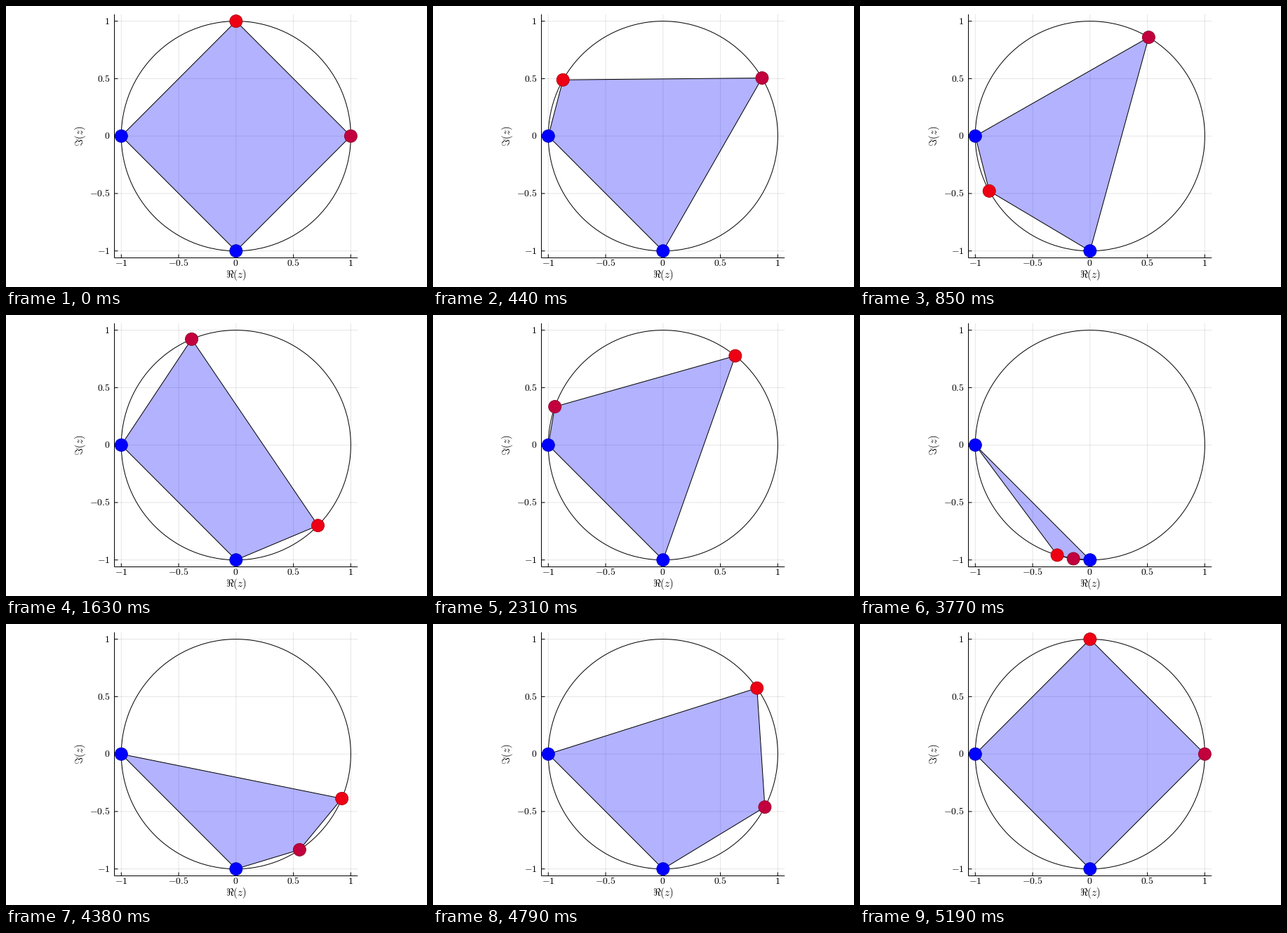
Write a matplotlib script that moves like this. It is 600 px wide and 400 px high and loops after 5210 ms.

```python
import numpy as np
import matplotlib.pyplot as plt
from matplotlib.animation import FuncAnimation
from matplotlib.patches import Circle, Polygon

W, H, DPI = 600, 400, 100
TICK_MS, LOOP_MS = 10, 5210
FPS, STEPS = 48, 250  # poses per second, poses per loop
LEFT, TOP, BOTTOM = 154.5, 11.8, 358.5
SIDE = BOTTOM - TOP
RIGHT = LEFT + SIDE
CX, CY, R = LEFT + SIDE / 2, TOP + SIDE / 2, SIDE / 2.12
PX = 72 / DPI  # points per pixel
BLUE, RED, CRIMSON = (0, 0, 1), (0.93, 0, 0.08), (0.76, 0, 0.24)

plt.rcParams["mathtext.fontset"] = "cm"

fig = plt.figure(figsize=(W / DPI, H / DPI), dpi=DPI, facecolor="white")
ax = fig.add_axes([0, 0, 1, 1])
ax.set_xlim(0, W)
ax.set_ylim(H, 0)
ax.axis("off")


def point(angle):
    return CX + R * np.cos(angle), CY - R * np.sin(angle)


def line(xs, ys, **style):
    ax.plot(xs, ys, color="black", lw=PX, solid_capstyle="butt", snap=False, **style)


def label(x, y, text, size, **style):
    ax.text(x, y, f"${text}$", fontsize=size * PX, **style)


def dot(color):
    edge = tuple(0.75 * c for c in color)
    return ax.add_patch(Circle((0, 0), 9, fc=color, ec=edge, lw=0.9 * PX, zorder=5))


# Grid, ticks and tick labels
for v in (-1, -0.5, 0, 0.5, 1):
    x, y = CX + R * v, CY - R * v
    line([x, x], [TOP, BOTTOM], alpha=0.1, zorder=1)
    line([LEFT, RIGHT], [y, y], alpha=0.1, zorder=1)
    line([x, x], [BOTTOM - 5, BOTTOM], zorder=2)
    line([LEFT, LEFT + 5], [y, y], zorder=2)
    label(x - 0.4, 370.5, f"{v:g}", 13.7, ha="center", va="baseline")
    label(148.3, y + 4.3, f"{v:g}", 13.7, ha="right", va="baseline")

line([LEFT, LEFT], [TOP, BOTTOM], zorder=2)
line([LEFT, RIGHT], [BOTTOM, BOTTOM], zorder=2)
label(CX, 383.3, r"\Re(z)", 15, ha="center", va="center")
label(106.3, CY - 0.5, r"\Im(z)", 15, ha="center", va="center", rotation=90)

ax.add_patch(Circle((CX, CY), R, fill=False, ec="black", lw=PX, zorder=3))
quad = ax.add_patch(Polygon([(0, 0)] * 4, fc=(0, 0, 1, 0.3), ec="black", lw=PX,
                            snap=False, zorder=4))

FIXED = (np.pi, 1.5 * np.pi)
for a in FIXED:
    dot(BLUE).center = point(a)
slow, fast = dot(CRIMSON), dot(RED)


def update(i):
    # Poses change at 48 per second, rounded to the nearest 10 ms tick
    step = int((i + 0.49) * TICK_MS * FPS / 1000)
    theta = 2 * np.pi * step / (STEPS - 1)
    a, b = theta, 2 * theta + np.pi / 2  # z and i*z^2
    slow.center, fast.center = point(a), point(b)
    order = sorted(t % (2 * np.pi) for t in (*FIXED, a, b))
    quad.set_xy([point(t) for t in order])
    return quad, slow, fast


anim = FuncAnimation(fig, update, frames=LOOP_MS // TICK_MS, interval=TICK_MS,
                     repeat=True, repeat_delay=0, blit=False)
plt.show()
```
